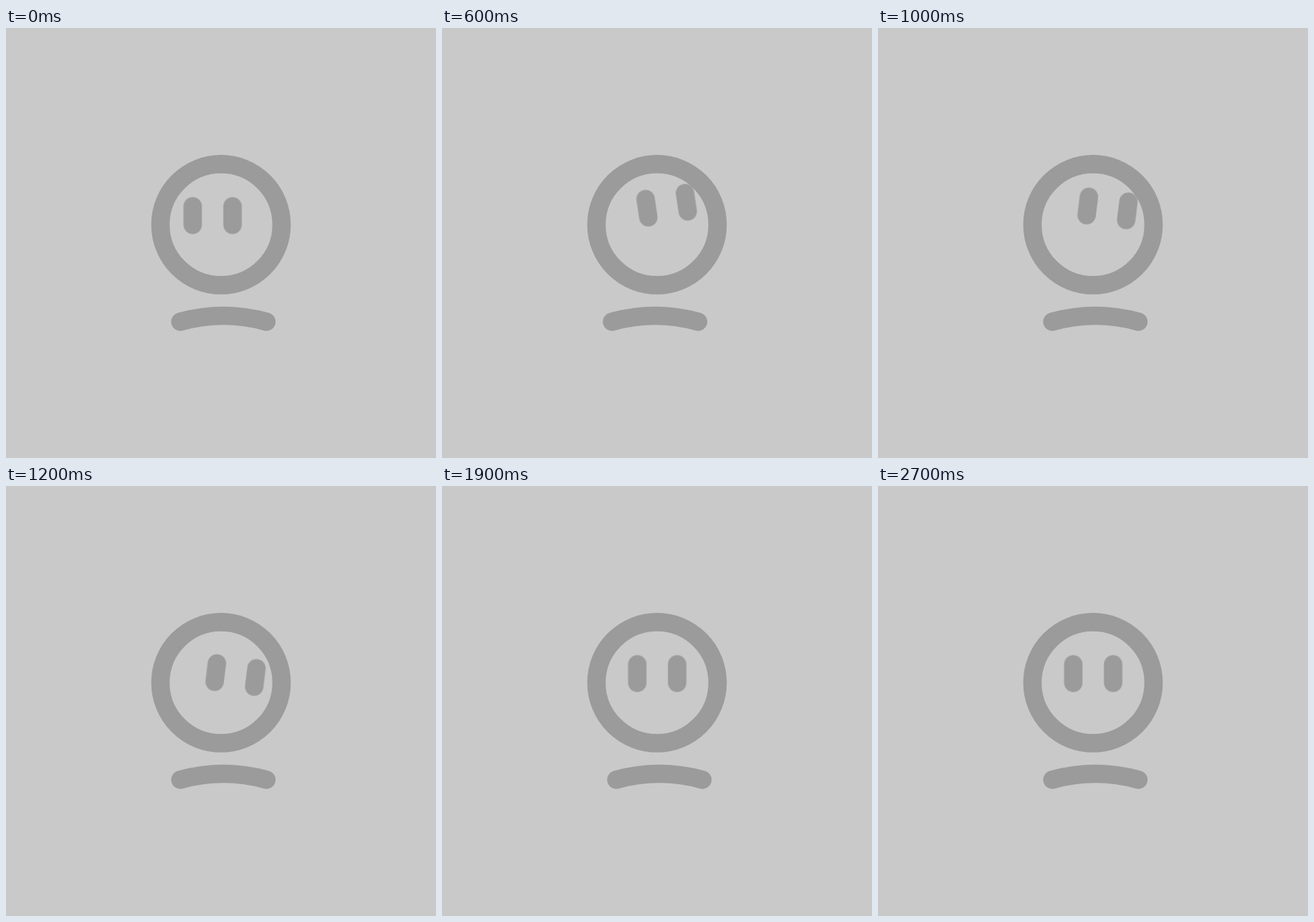
Animation of 600x600 px, one loop 2800 ms. Source, as an HTML page:

```html
<!DOCTYPE html>
<html lang="en">
<head>
<meta charset="utf-8">
<title>Restless face</title>
<style>
  html, body { margin: 0; width: 100%; height: 100%; overflow: hidden; background: #c9c9c9; }
  svg { display: block; width: 100%; height: 100%; }
  .line { fill: none; stroke: #9b9b9b; stroke-width: 25.7; stroke-linecap: round; }
  .ring, .mouth, .open, .shut { animation: 2.8s step-end infinite; }
  .ring { animation-name: ring; }
  .mouth { animation-name: mouth; }
  .open { animation-name: look; }
  .shut { animation-name: blink; }

  /* 100 ms = 3.5714% */
  @keyframes ring {
    0%, 14.2857%, 28.5714%, 32.1429%, 89.2857%, 100% { transform: translate(0, 0); }
    10.7143% { transform: translate(6px, 0); }
    25% { transform: translate(-6px, 0); }
    28.5714% { transform: translate(6px, 0); }
    85.7143% { transform: translate(6px, 6px); }
  }
  @keyframes mouth {
    0%, 25%, 32.1429%, 89.2857%, 100% { transform: translate(0, 0); }
    21.4286% { transform: translate(-6px, 0); }
    28.5714% { transform: translate(0, 6px); }
    85.7143% { transform: translate(6px, 6px); }
  }
  @keyframes look {
    0% {
      transform: translate(288.3px, 261.7px) rotate(0deg);
      animation-timing-function: steps(6, end);
    }
    21.4286% {
      transform: translate(313.5px, 247.3px) rotate(-8.6deg);
      animation-timing-function: steps(4, end);
    }
    35.7143% {
      transform: translate(320.3px, 251.8px) rotate(7deg);
      animation-timing-function: steps(2, end);
    }
    42.8571% { transform: translate(320.3px, 263.8px) rotate(7deg); }
    46.4286% { transform: translate(326.3px, 269.8px) rotate(7deg); }
    50% {
      transform: translate(320.3px, 275.8px) rotate(7deg);
      animation-timing-function: steps(2, end);
    }
    57.1429% { transform: translate(314.3px, 293.9px) rotate(7deg); }
    60.7143% { transform: translate(314.3px, 300.5px) rotate(7deg); }
    64.2857% { transform: translate(308.3px, 280px) rotate(7deg); }
    67.8571% { transform: translate(300.3px, 261.7px) rotate(0deg); visibility: visible; }
    85.7143% { transform: translate(300.3px, 261.7px) rotate(0deg); visibility: hidden; }
    92.8571% { transform: translate(306.3px, 267.7px) rotate(0deg); visibility: visible; }
    96.4286%, 100% { transform: translate(300.3px, 261.7px) rotate(0deg); }
  }
  @keyframes blink {
    0%, 92.8571%, 100% { transform: translate(0, 0); visibility: hidden; }
    85.7143% { transform: translate(6px, 6px); visibility: visible; }
    89.2857% { transform: translate(0, 0); visibility: visible; }
  }
</style>
</head>
<body>
<svg viewBox="0 0 600 600">
  <g class="line">
    <circle class="ring" cx="300" cy="274.4" r="84.5"/>
    <path class="mouth" d="M243.3 409.8Q303.3 393.2 363.3 409.8"/>
    <path class="open" d="M-27.8 -12.8V12.8M27.8 -12.8V12.8"/>
    <path class="shut" d="M268.8 271.3L278.2 269.7M326.2 269.9L335.6 268.3"/>
  </g>
</svg>
</body>
</html>
```
